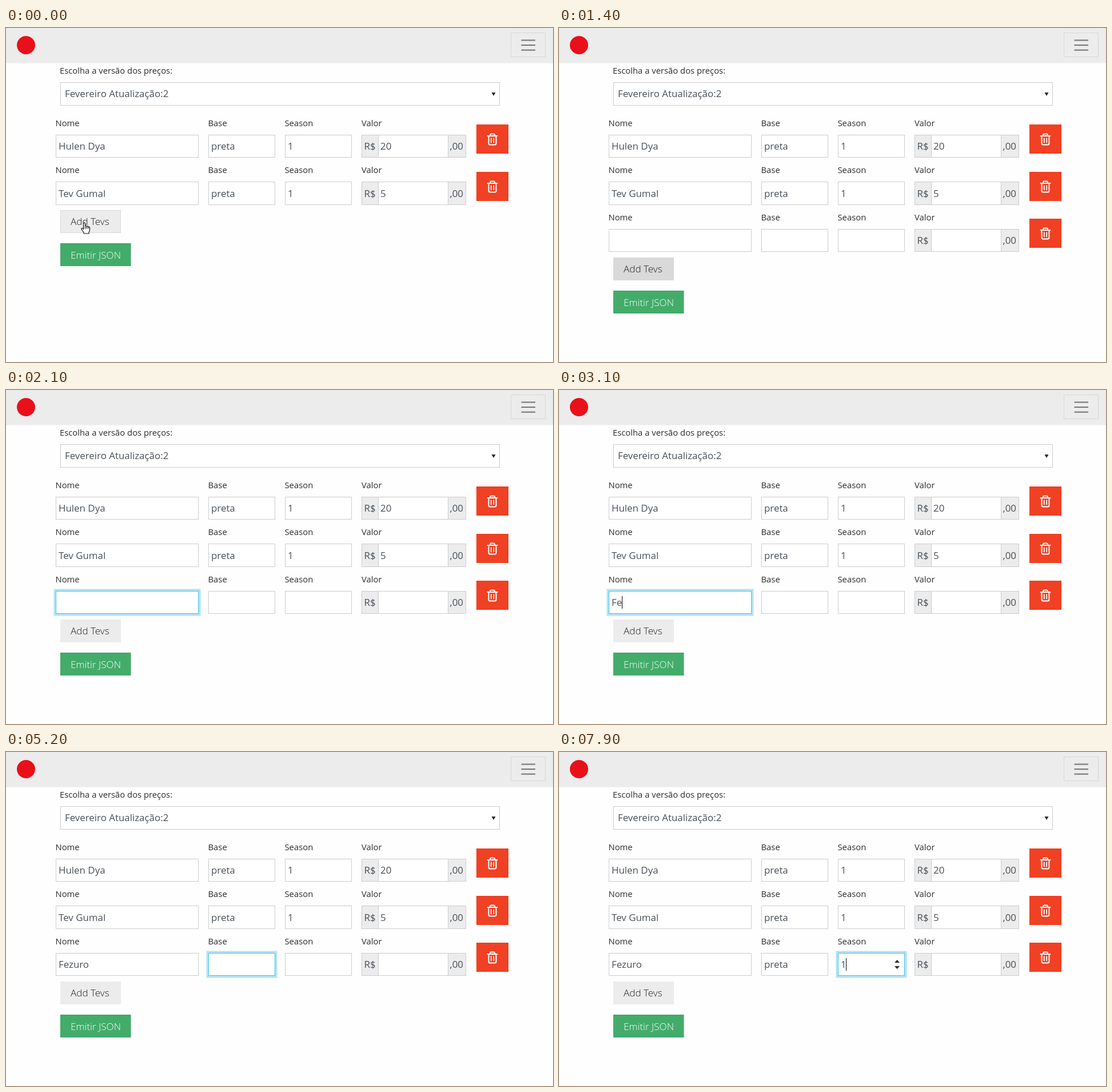
Recreate the animation shown at these times as an HTML page with a canvas. Size 957 by 585 pixels, loop 8000 ms.

```html
<!DOCTYPE html>
<html lang="pt">
<head>
<meta charset="utf-8">
<title>Tabela de preços</title>
<style>
html, body { margin: 0; width: 100%; height: 100%; overflow: hidden; background: #fefefe; }
canvas { display: block; }
</style>
</head>
<body>
<canvas id="stage" width="957" height="585"></canvas>
<script>
const ctx = document.getElementById('stage').getContext('2d');
const LOOP = 8000;
const FAMILY = '"Open Sans", "Noto Sans", sans-serif';
const INPUT_FONT = `400 16.9px ${FAMILY}`;
const BUTTON_FONT = `300 17.1px ${FAMILY}`;
const LABEL_FONT = `400 14.8px ${FAMILY}`;
const GREY = '#ececec', BORDER = '#cccccc', INK = '#495057', DARK = '#2b2b2b';
const PAD = 5;

const ROW_Y = [187, 269, 352], ROW_H = [40, 41, 40];
const FIELDS = {
  nome: { x: 87, w: 250, label: 'Nome' },
  base: { x: 354, w: 117, label: 'Base' },
  season: { x: 488, w: 117, label: 'Season' }
};
const SAVED = [
  { nome: 'Hulen Dya', base: 'preta', season: '1', valor: '20' },
  { nome: 'Tev Gumal', base: 'preta', season: '1', valor: '5' }
];

// Each field: when it gains focus and when each letter is typed.
const TYPING = [
  { field: 'nome', focus: 1600, text: 'Fezuro', keys: [2700, 3100, 3300, 3400, 3700, 3900] },
  { field: 'base', focus: 4700, text: 'preta', keys: [5600, 5700, 5800, 6000, 6300] },
  { field: 'season', focus: 6900, text: '1', keys: [7900] }
];

const clamp = v => Math.max(0, Math.min(1, v));

function fill(x, y, w, h, color) {
  ctx.fillStyle = color;
  ctx.fillRect(x, y, w, h);
}

function box(x, y, w, h, color, border) {
  fill(x, y, w, h, border);
  fill(x + 1, y + 1, w - 2, h - 2, color);
}

function text(str, x, y, font, color) {
  ctx.font = font;
  ctx.fillStyle = color;
  ctx.fillText(str, x, y);
}

function triangle(x, y, half, height, color = DARK) {
  ctx.fillStyle = color;
  ctx.beginPath();
  ctx.moveTo(x - half, y);
  ctx.lineTo(x + half, y);
  ctx.lineTo(x, y + height);
  ctx.fill();
}

function trash(y) {
  box(823, y, 56, 51, '#f04124', '#ee3a1c');
  ctx.save();
  ctx.translate(841.5, y + 15.5);
  ctx.strokeStyle = '#ffffff';
  ctx.lineWidth = 2;
  ctx.lineJoin = ctx.lineCap = 'round';
  ctx.stroke(new Path2D('M1 4.5H18M5.5 4.5V3Q5.5 1 7.5 1H11.5Q13.5 1 13.5 3V4.5M3 4.5V17.5Q3 20 5.5 20H13.5Q16 20 16 17.5V4.5'));
  ctx.lineWidth = 1.7;
  ctx.stroke(new Path2D('M7.3 8.5V16M11.7 8.5V16'));
  ctx.restore();
}

function header() {
  fill(0, 0, 957, 61.5, GREY);
  ctx.fillStyle = '#e9101a';
  ctx.beginPath();
  ctx.arc(35, 30, 16, 0, Math.PI * 2);
  ctx.fill();
  box(883, 8, 61, 43, GREY, '#d7d7d7');
  for (const y of [20.4, 29, 37.6]) fill(901.5, y, 24.5, 2.1, '#767676');
}

function priceSelect() {
  text('Escolha a versão dos preços:', 94, 80, LABEL_FONT, DARK);
  box(95, 95, 769, 41, '#ffffff', BORDER);
  text('Fevereiro Atualização:2', 103, 121, INPUT_FONT, INK);
  triangle(853, 113, 3.5, 6);
}

const baseline = i => Math.round(ROW_Y[i] + ROW_H[i] / 2 + 6);

function row(i, values) {
  const y = ROW_Y[i], h = ROW_H[i], base = baseline(i);
  for (const key in FIELDS) {
    const f = FIELDS[key];
    text(f.label, f.x - 0.5, y - 15, LABEL_FONT, DARK);
    box(f.x, y, f.w, h, '#ffffff', BORDER);
    text(values[key] || '', f.x + PAD, base, INPUT_FONT, INK);
  }
  text('Valor', 622, y - 15, LABEL_FONT, DARK);
  box(622, y, 183, h, GREY, BORDER);
  box(651, y, 123, h, '#ffffff', BORDER);
  text('R$', 626.5, base, INPUT_FONT, INK);
  text(values.valor || '', 655, base, INPUT_FONT, INK);
  text(',00', 776.5, base, INPUT_FONT, INK);
  trash(Math.round(169 + 82.5 * i));
}

function focusField(key, value, strength, caretOn) {
  const f = FIELDS[key], y = ROW_Y[2], h = ROW_H[2], ring = 3.5;
  ctx.globalAlpha = strength;
  fill(f.x - ring, y - ring, f.w + 2 * ring, h + 2 * ring, '#b4e2f4');
  ctx.globalAlpha = 1;
  box(f.x, y, f.w, h, '#ffffff', BORDER);
  ctx.globalAlpha = strength;
  ctx.lineWidth = 1;
  ctx.strokeStyle = '#3bc8f5';
  ctx.strokeRect(f.x + 0.5, y + 0.5, f.w - 1, h - 1);
  ctx.globalAlpha = 1;
  text(value, f.x + PAD, baseline(2), INPUT_FONT, INK);
  if (caretOn) {
    const x = f.x + PAD - 0.5 + ctx.measureText(value).width;
    fill(Math.round(x), y + 9, 1, 22, '#000000');
  }
  if (key === 'season') {
    triangle(591.5, 369, 4.5, -5);
    triangle(591.5, 375, 4.5, 5);
  }
}

function buttons(dy, shade, outlined) {
  const c = Math.round(236 - 19 * shade);
  const color = `rgb(${c},${c},${c})`;
  box(95, 319 + dy, 106, 40, color, outlined ? '#d9d9d9' : color);
  text('Add Tevs', 113, 345 + dy, BUTTON_FONT, '#222222');
  box(95, 377 + dy, 123.5, 40, '#43ac6a', '#3fa364');
  text('Emitir JSON', 113, 404 + dy, BUTTON_FONT, '#ffffff');
}

function hand(x, y) {
  ctx.save();
  ctx.translate(x, y);
  const shape = new Path2D('M-1.5 1.5Q0 -0.5 1.5 1.5V6.5Q3.3 5.3 4.3 7Q6 6 7 7.8Q9.5 7.2 9.5 10V13Q9.5 15 8 17V19.5H-1V17.5L-5 12Q-5.5 9.5 -3.3 10.2L-1.5 12Z');
  ctx.lineJoin = 'round';
  ctx.lineWidth = 1.2;
  ctx.fillStyle = '#ffffff';
  ctx.strokeStyle = '#111111';
  ctx.fill(shape);
  ctx.stroke(shape);
  ctx.stroke(new Path2D('M1.5 7V11M4.3 7.5V11M7 8.5V11'));
  ctx.restore();
}

function newRow(t) {
  const values = {};
  for (const { field, text: word, keys } of TYPING) {
    values[field] = word.slice(0, keys.filter(k => k <= t).length);
  }
  row(2, values);
  TYPING.forEach(({ field, focus, keys }, i) => {
    if (t < focus) return;
    const end = i + 1 < TYPING.length ? TYPING[i + 1].focus : LOOP;
    const active = t < end;
    const fadeIn = field === 'season' ? 1 : clamp(0.3 + (t - focus) / 250);
    const fadeOut = field === 'nome' ? clamp(0.7 - (t - end) / 200) : 0;
    const strength = active ? fadeIn : fadeOut;
    if (strength <= 0) return;
    const lastChange = Math.max(focus, ...keys.filter(k => k <= t));
    const caretOn = active && Math.floor((t - lastChange) / 500) % 2 === 0;
    focusField(field, values[field], strength, caretOn);
  });
}

function draw(time) {
  // The screen changes in steps of 100 ms.
  const t = Math.floor(time / 100) * 100;
  const added = t >= 1400;
  fill(0, 0, 957, 585, '#fefefe');
  header();
  priceSelect();
  SAVED.forEach((values, i) => row(i, values));
  if (added) newRow(t);

  const shade = added ? clamp(1 - (t - 1400) / 200) : clamp((t - 900) / 200);
  buttons(added ? 83 : 0, shade, t < 1000);
  if (t < 1000) hand(137, 340.5);
  else if (!added) hand(139.5, 354);
}

function tick(now) {
  draw(now % LOOP);
  requestAnimationFrame(tick);
}
draw(0);
requestAnimationFrame(tick);
</script>
</body>
</html>
```
